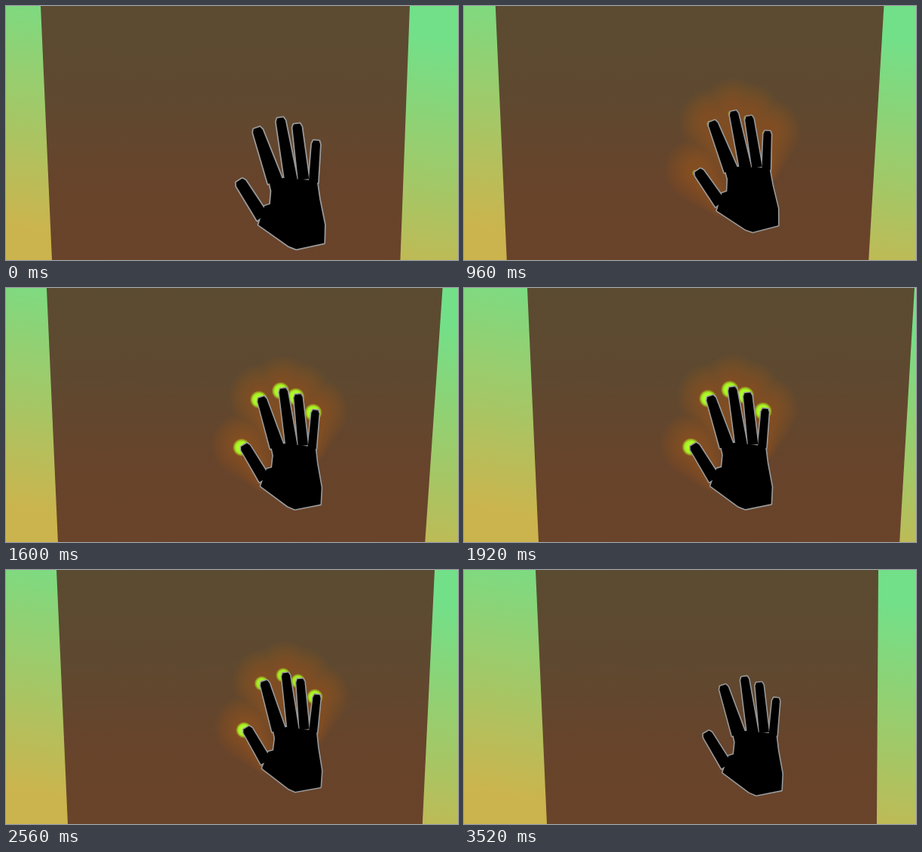
An HTML page with a canvas for the animation above (3.6 s loop, 600 by 338 pixels).

```html
<!DOCTYPE html>
<html lang="en">
<head>
<meta charset="utf-8">
<title>Glowing hand</title>
<style>
  html, body { margin: 0; width: 100%; height: 100%; overflow: hidden; background: #a0c868; }
  canvas { display: block; width: 600px; height: 338px; }
</style>
</head>
<body>
<canvas id="stage" width="600" height="338"></canvas>
<script>
const ctx = document.getElementById('stage').getContext('2d');
const W = 600, H = 338, LOOP = 3600, STEP = 80;

// Where the hand (middle fingertip) and the panel's top edge are
const KEYS = [
  { at: 0,    x: 364, y: 150, turn: 2.3, size: 1.11, left: 46, width: 490 },
  { at: 560,  x: 334, y: 145, turn: 8,   size: 1.06, left: 68, width: 492 },
  { at: 1280, x: 376, y: 138, turn: 1.1, size: 1.01, left: 27, width: 531 },
  { at: 1920, x: 356, y: 133, turn: 1.4, size: 1.03, left: 84, width: 514 },
  { at: 2560, x: 371, y: 138, turn: 0,   size: 1,    left: 67, width: 502 },
  { at: 3200, x: 378, y: 139, turn: -1,  size: 0.97, left: 86, width: 489 },
  { at: 3520, x: 372, y: 143, turn: 1.1, size: 1,    left: 95, width: 455 }
];

// Relative to the middle fingertip; ends is when the fingertip stops shining
const FINGERS = [
  { tip: [-52, 72], base: [-26, 117], thin: 13, thick: 15, ends: 3520 },
  { tip: [-28.5, 10], base: [-9, 75], thin: 12, thick: 18, ends: 3150 },
  { tip: [0, -1], base: [10, 74], thin: 11, thick: 15, ends: 3150 },
  { tip: [19.5, 7], base: [25, 74], thin: 11, thick: 13, ends: 3150 },
  { tip: [42, 28], base: [36.5, 78], thin: 10, thick: 11, ends: 3520 }
];
const PALM = [
  [-31, 126], [-23, 104], [-16, 102], [-14, 86], [-16, 76], [1, 71], [32, 75],
  [41, 78], [43, 98], [48, 129], [46.5, 151], [13, 157], [4, 153]
];

const clamp = v => Math.min(1, Math.max(0, v));
const ramp = (t, from, to) => clamp((t - from) / (to - from));
const along = (a, b, s) => a.map((v, i) => v + (b[i] - v) * s);

// Smooth interpolation through uneven key times
function poseAt(t) {
  const last = KEYS.length - 1;
  if (t >= KEYS[last].at) return KEYS[last];
  const i = KEYS.findIndex(k => k.at > t) - 1;
  const span = KEYS[i + 1].at - KEYS[i].at, u = (t - KEYS[i].at) / span;
  const slope = (k, name) => {
    const a = KEYS[Math.max(k - 1, 0)], b = KEYS[Math.min(k + 1, last)];
    return (b[name] - a[name]) / (b.at - a.at) * span;
  };
  const pose = {};
  for (const name in KEYS[i]) {
    const a = KEYS[i][name], d = KEYS[i + 1][name] - a;
    const m = slope(i, name), n = slope(i + 1, name);
    pose[name] = a + u * (m + u * (3 * d - 2 * m - n + u * (m + n - 2 * d)));
  }
  return pose;
}

function gradient(stops, x0 = 0, x1 = 0) {
  const g = ctx.createLinearGradient(x0, 0, x1, H);
  stops.forEach(([at, color]) => g.addColorStop(at, color));
  return g;
}

const sky = gradient([[0, '#72e089'], [0.5, '#9dcb6b'], [1, '#cbb44d']], 330, 270);
const wood = gradient([[0, '#5b4b31'], [0.35, '#5e4930'], [0.7, '#67442b'], [1, '#69432a']]);

function polygon(points) {
  const path = new Path2D();
  points.forEach(p => path.lineTo(...p));
  path.closePath();
  return path;
}

// Tapered finger with a bevelled tip
function finger({ tip, base, thin, thick }) {
  const dx = base[0] - tip[0], dy = base[1] - tip[1], len = Math.hypot(dx, dy);
  const side = (s, half) => {
    const [x, y] = along(tip, base, s);
    return [x + dy / len * half, y - dx / len * half];
  };
  const bevel = 4 / len;
  return polygon([
    side(1, -thick / 2), side(bevel, -thin / 2), side(0, -thin / 3),
    side(0, thin / 3), side(bevel, thin / 2), side(1, thick / 2)
  ]);
}

const parts = [...FINGERS.map(finger), polygon(PALM)];

// The wider the panel looks, the more its right side leans in
function drawPanel({ left, width }) {
  const right = left + width;
  ctx.fillStyle = sky;
  ctx.fillRect(0, 0, W, H);
  ctx.fillStyle = wood;
  ctx.fill(polygon([[left, 0], [right, 0], [right - 0.3 * (width - 448), H], [left + 15, H]]));
}

// Nested bands, each the union of discs shrinking from fingertip to palm
function drawHalo(radius) {
  const bands = 9;
  ctx.fillStyle = 'rgba(160, 80, 30, 0.06)';
  for (let k = 0; k < bands; k++) {
    ctx.beginPath();
    for (const { tip, base } of FINGERS) {
      for (let s = 0; s <= 1; s += 0.1) {
        const r = (radius - 24 * s) * (1 - k / (bands + 3));
        if (r <= 0) continue;
        const [x, y] = along(tip, base, s);
        ctx.moveTo(x + r, y);
        ctx.arc(x, y, r, 0, 7);
      }
    }
    ctx.fill();
  }
}

function drawSpot(x, y, r) {
  if (r < 1) return;
  const g = ctx.createRadialGradient(x, y, 0, x, y, r);
  g.addColorStop(0, '#c4ff40');
  g.addColorStop(0.65, '#a4f422');
  g.addColorStop(0.85, 'rgba(164, 190, 30, 0.7)');
  g.addColorStop(1, 'rgba(150, 110, 25, 0)');
  ctx.globalAlpha = clamp(r / 11);
  ctx.fillStyle = g;
  ctx.beginPath();
  ctx.arc(x, y, r, 0, 7);
  ctx.fill();
  ctx.globalAlpha = 1;
}

function drawHand() {
  ctx.lineJoin = 'round';
  ctx.lineWidth = 3.2;
  ctx.strokeStyle = '#999';
  ctx.fillStyle = '#000';
  parts.forEach(p => ctx.stroke(p));
  parts.forEach(p => ctx.fill(p));
}

function frame() {
  const t = Math.floor(performance.now() % LOOP / STEP) * STEP;
  const pose = poseAt(t);
  drawPanel(pose);
  ctx.save();
  ctx.translate(pose.x, pose.y);
  ctx.rotate(-pose.turn * Math.PI / 180);
  ctx.scale(pose.size, pose.size);
  drawHalo(42 * Math.sqrt(ramp(t, 0, 960) * ramp(t, 3520, 3120)));
  for (const { tip: [x, y], ends } of FINGERS) {
    drawSpot(x - 3, y + 3, 12 * ramp(t, 800, 1200) * (1 - ramp(t, 1900, ends) ** 3));
  }
  drawHand();
  ctx.restore();
  requestAnimationFrame(frame);
}
frame();
</script>
</body>
</html>
```
